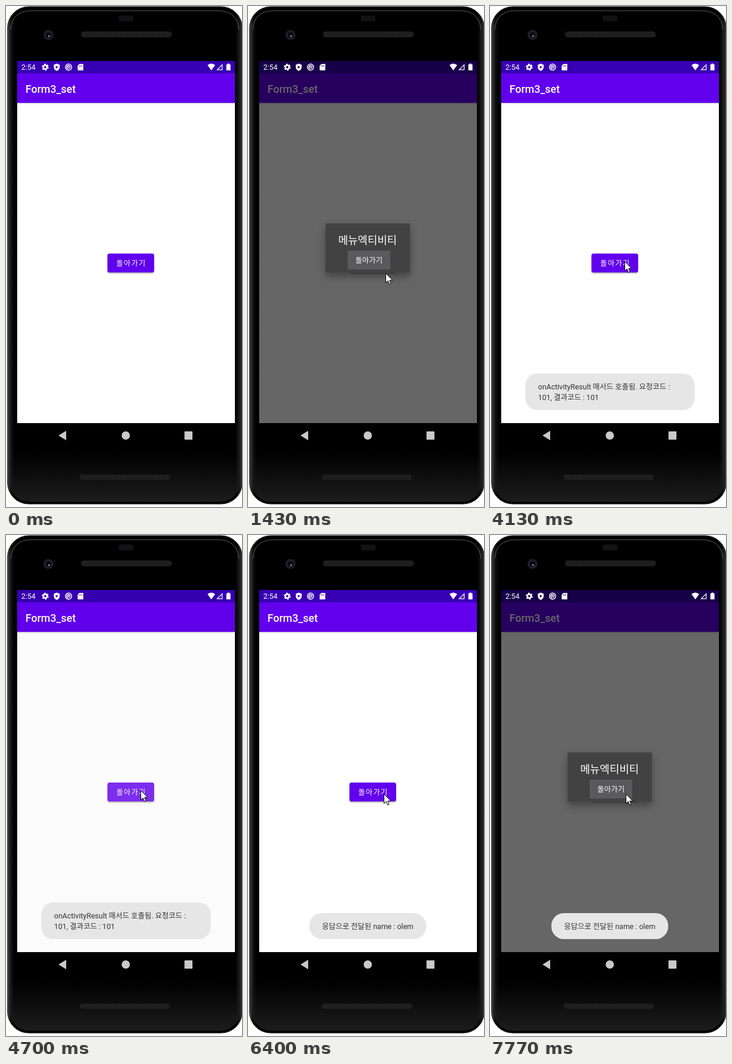
Recreate the animation shown at these times as an HTML page. Size 400x848 px, loop 8000 ms.

```html
<!DOCTYPE html>
<html lang="ko">
<head>
<meta charset="utf-8">
<title>Dialog demo</title>
<style>
html, body { margin: 0; width: 100%; height: 100%; overflow: hidden; background: #fff; }
svg { display: block; width: 400px; height: 848px; }
text { font: 12.5px Roboto, "Noto Sans CJK KR", "Noto Sans CJK", sans-serif; white-space: pre; }
.heading { font-size: 18px; }
.medium { font-weight: 500; }

.dim, .dialog, .toast1, .toast2, .ripple, .press, .cursor {
  animation: 8s linear infinite;
}
.dim { animation-name: dim; }
.dialog { animation-name: dialog; }
.toast1 { animation-name: toast1; }
.toast2 { animation-name: toast2; }
.press { animation-name: press; }
.ripple { animation-name: ripple; transform-box: fill-box; transform-origin: center; }
.cursor { animation-name: cursor; animation-timing-function: ease-in-out; }

@keyframes dim {
  0%, 9.25% { opacity: 0; }
  14.75%, 27.09% { opacity: 1; }
  31.46%, 58.625% { opacity: 0; }
  64.125%, 69.375% { opacity: 1; }
  73.75%, 91.625% { opacity: 0; }
  97.125%, 100% { opacity: 1; }
}
/* Enters decelerating, leaves accelerating. */
@keyframes dialog {
  0% { transform: translateY(592px); opacity: 0; }
  9.25%, 58.625%, 91.625% {
    transform: translateY(592px); opacity: 0;
    animation-timing-function: cubic-bezier(.333, .667, .667, 1);
  }
  14.75%, 64.125%, 97.125%, 100% { transform: translateY(0); opacity: 1; }
  27.09%, 69.375% {
    transform: translateY(0); opacity: 1;
    animation-timing-function: cubic-bezier(.333, 0, .667, .333);
  }
  31.46%, 73.75% { transform: translateY(592px); opacity: 0; }
}
@keyframes toast1 {
  0%, 27.9% { opacity: 0; }
  33.4%, 76.25% { opacity: 1; }
  78%, 100% { opacity: 0; }
}
@keyframes toast2 {
  0%, 77.5% { opacity: 0; }
  80%, 100% { opacity: 1; }
}
@keyframes press {
  0%, 7.5% { opacity: 0; }
  9% { opacity: .2; }
  12%, 57% { opacity: 0; }
  58.5% { opacity: .2; }
  61.5%, 90.3% { opacity: 0; }
  91.8% { opacity: .2; }
  94.8%, 100% { opacity: 0; }
}
@keyframes ripple {
  0%, 25.5% { transform: scale(0); }
  28.3%, 31.5% { transform: scale(1); }
  31.6%, 67.9% { transform: scale(0); }
  70.6%, 73.8% { transform: scale(1); }
  73.9%, 100% { transform: scale(0); }
}
@keyframes cursor {
  0%, .375% { transform: translate(420px, 860px); }
  6.25%, 14.75% { transform: translate(228px, 440px); }
  17.5%, 18.4% { transform: translate(233px, 452px); }
  25%, 42.125% { transform: translate(211px, 434px); }
  47.5%, 64.125% { transform: translate(228px, 432px); }
  66.6%, 70.4% { transform: translate(224px, 432px); }
  75.5%, 100% { transform: translate(230px, 438px); }
}
</style>
</head>
<body>
<svg viewBox="0 0 400 848">
  <defs>
    <linearGradient id="chin" x2="0" y2="1">
      <stop offset="0" stop-color="#1c1c1c" stop-opacity="0"/>
      <stop offset="1" stop-color="#1c1c1c"/>
    </linearGradient>
    <linearGradient id="rim">
      <stop offset="0" stop-color="#4c4c50"/>
      <stop offset=".013" stop-color="#131314"/>
      <stop offset=".03" stop-color="#000"/>
      <stop offset=".97" stop-color="#000"/>
      <stop offset=".987" stop-color="#161618"/>
      <stop offset="1" stop-color="#36363a"/>
    </linearGradient>
    <pattern id="mesh" width="3" height="3" patternUnits="userSpaceOnUse">
      <path d="M0 0h3v3h-3z" fill="#181818"/>
      <path d="M0 0h1.5v1.5h-1.5z" fill="#333"/>
    </pattern>
    <clipPath id="screen"><path d="M19 93h369v613H19z"/></clipPath>
    <clipPath id="dialogButton"><path d="M169 414h72v32h-72z"/></clipPath>
    <filter id="shadow" x="-30%" y="-30%" width="160%" height="180%">
      <feDropShadow dx="0" dy="6" stdDeviation="7" flood-opacity=".35"/>
    </filter>
    <filter id="lift" x="-10%" y="-20%" width="120%" height="150%">
      <feDropShadow dx="0" dy="1.5" stdDeviation="1" flood-opacity=".35"/>
    </filter>
  </defs>

  <!-- phone -->
  <rect x="2.5" y="1" width="398" height="842" rx="36" fill="url(#rim)" stroke="#2c2c2e"/>
  <path d="M9 755H394V806Q394 838 362 838H41Q9 838 9 806Z" fill="url(#chin)"/>
  <path d="M8 40Q10 9 42 8H361Q392 9 395 40" fill="none" stroke="#5c5c60"/>
  <path d="M8 40V806Q10 838 42 839H361Q392 838 395 806V40" fill="none" stroke="#222224"/>
  <rect x="127" y="43" width="154" height="10" rx="5" fill="url(#mesh)"/>
  <rect x="125" y="793" width="153" height="9" rx="4.5" fill="url(#mesh)"/>
  <rect x="191" y="16" width="25" height="10" rx="3" fill="#121214"/>
  <circle cx="72" cy="49" r="8.5" fill="#1d1d2a"/>
  <circle cx="72" cy="49" r="4.5" fill="#08080e"/>
  <circle cx="73" cy="51" r="1.4" fill="#a4a4a8"/>

  <g clip-path="url(#screen)">
    <!-- main screen -->
    <path d="M19 164h369v542H19z" fill="#fff"/>
    <path d="M19 114h369v50H19z" fill="#6200ee"/>
    <path d="M19 93h369v21H19z" fill="#3700b3"/>
    <path d="M19 164h369v2H19z" fill="#000" opacity=".12"/>
    <text class="heading medium" x="33" y="146.5" fill="#fff">Form3_set</text>
    <rect x="172" y="419" width="79" height="32" rx="3.5" fill="#6200ee" filter="url(#lift)"/>
    <rect class="press" x="172" y="419" width="79" height="32" rx="3.5" fill="#fff"/>
    <text class="medium" x="187" y="439.5" fill="#fff" letter-spacing="1.1">돌아가기</text>

    <path class="dim" d="M19 93h369v613H19z" fill="#000" fill-opacity=".6"/>

    <g class="dialog">
      <path d="M131.5 368h143v83.5h-143z" fill="#424242" filter="url(#shadow)"/>
      <text class="heading" x="153" y="402.5" fill="#fff">메뉴엑티비티</text>
      <g clip-path="url(#dialogButton)">
        <path d="M169 414h72v32h-72z" fill="#5a595b"/>
        <circle class="ripple" cx="224" cy="430" r="58" fill="#7b7a7c"/>
      </g>
      <text x="182" y="434.5" fill="#fff">돌아가기</text>
    </g>

    <g class="toast1">
      <rect x="60" y="622" width="287" height="62" rx="20" fill="#e6e6e6"/>
      <text x="81.5" y="648.5" fill="#333">onActivityResult 매서드 호출됨. 요청코드 :</text>
      <text x="81.5" y="667" fill="#333">101, 결과코드 : 101</text>
    </g>
    <g class="toast2">
      <rect x="104" y="640" width="198" height="44" rx="21" fill="#e6e6e6"/>
      <text x="125.5" y="667" fill="#333">응답으로 전달된 name : olem</text>
    </g>
  </g>

  <!-- status bar -->
  <g fill="#fff">
    <text x="26" y="108">2:54</text>
    <circle cx="66.5" cy="103.5" r="3.2" fill="none" stroke="#fff" stroke-width="2.6"/>
    <circle cx="66.5" cy="103.5" r="4.9" fill="none" stroke="#fff" stroke-width="2" stroke-dasharray="2.56 2.57"/>
    <path fill-rule="evenodd" d="M86 97.5l5 2v4q0 4-5 6.5q-5-2.5-5-6.5v-4zM84.5 101v5l4-2.5z"/>
    <g fill="none" stroke="#fff">
      <circle cx="106" cy="103.5" r="5.3" stroke-width="1.4"/>
      <path d="M108.5 106l-5-5M108.8 104a2.9 2.9 0 1 0-2.8 2.5" stroke-width="1.5"/>
    </g>
    <path fill-rule="evenodd" d="M124.500 98h6.500v11h-9.500v-8zM124 100.500v2h1v-2zM126 100.500v2h1v-2zM128 100.500v2h1v-2z"/>
    <path d="M341.500 100q6.500-5 13 0l-6.500 9z"/>
    <path d="M367 98v10.500h-10.500zM365.800 101l-6.300 6.300h6.300z" fill-rule="evenodd"/>
    <path d="M375.500 97.500h3v1.200h2v10.300h-7v-10.300h2z"/>
  </g>

  <!-- navigation bar -->
  <g fill="#c9c9c9">
    <path d="M89 727l13-8v16z"/>
    <circle cx="203" cy="727" r="7"/>
    <rect x="302.5" y="720" width="13.5" height="14" rx="1"/>
  </g>

  <path class="cursor" d="M.5 .5V16.5L4.2 13L6.7 19L9.3 18L6.8 12.2H12Z" fill="#fff" stroke="#000"/>
</svg>
</body>
</html>
```
